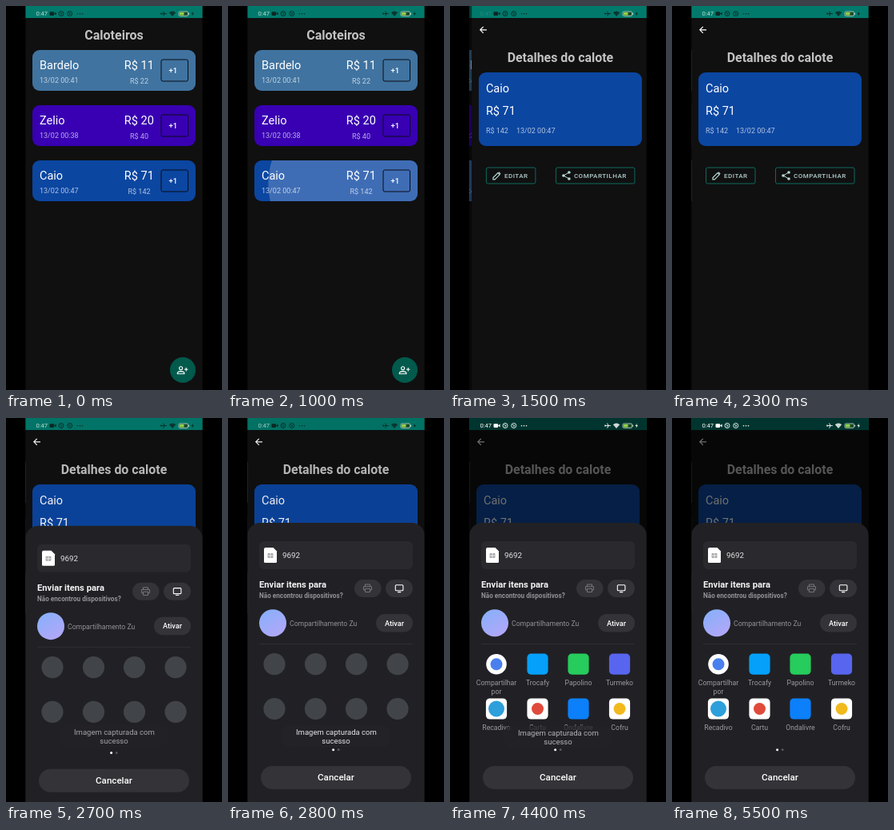
Animation, 270 px wide and 480 px high, one loop 6 s. Source, as an HTML page:

```html
<!DOCTYPE html>
<html lang="pt-BR">
<head>
<meta charset="utf-8">
<title>Caloteiros</title>
<style>
html, body { margin: 0; width: 100%; height: 100%; overflow: hidden; background: #000; }
svg { display: block; width: 100%; height: 100%; }
text { font-family: Roboto, "Noto Sans", sans-serif; white-space: pre; }
</style>
</head>
<body>
<svg id="stage" viewBox="0 0 270 480"></svg>
<script>
const LOOP = 6000, STEP = 100;
const $ = id => document.getElementById(id);
const set = (id, attrs) => {
  for (const k in attrs) $(id).setAttribute(k, attrs[k]);
};
const clamp = v => Math.max(0, Math.min(1, v));
const ramp = (t, a, b) => clamp((t - a) / (b - a));
const easeOut = v => 1 - (1 - v) ** 3;

// Markup helpers
const text = (x, y, s, size, fill = '#fff', extra = '') =>
  `<text x="${x}" y="${y}" font-size="${size}" fill="${fill}" ${extra}>${s}</text>`;
const mid = (x, y, s, size, fill, weight = 400) =>
  text(x, y, s, size, fill, `text-anchor="middle" font-weight="${weight}"`);
const rect = (x, y, w, h, r, fill, extra = '') =>
  `<rect x="${x}" y="${y}" width="${w}" height="${h}" rx="${r}" fill="${fill}" ${extra}/>`;
const dot = (x, y, r, fill, extra = '') =>
  `<circle cx="${x}" cy="${y}" r="${r}" fill="${fill}" ${extra}/>`;
const line = (d, color, w = 1, extra = '') =>
  `<path d="${d}" fill="none" stroke="${color}" stroke-width="${w}" ${extra}/>`;
const group = (id, body, extra = '') => `<g id="${id}" ${extra}>${body}</g>`;

// A 1080 x 2340 phone screen fitted to the stage height
const LEFT = 24.25, WIDTH = 221.5;
const full = (h, fill, extra) => rect(LEFT, 0, WIDTH, h, 0, fill, extra);

const BG = '#101011', TEAL = '#017a6c', SOFT = 'rgba(255,255,255,.68)', HEAD = '#c2c2c2';
const PILL = '#333338', MUTED = '#929296', LABEL = '#9b9b9f';

const card = (y, color, name, date, price, total, over = '') =>
  rect(33, y, 204, 51, 9, color) + over +
  text(42, y + 24, name, 14.5) +
  text(42, y + 40.5, date, 9, SOFT) +
  mid(166.3, y + 24, price, 14.5, '#fff') +
  mid(166.5, y + 42.3, total, 9, SOFT) +
  rect(194, y + 12, 33.5, 27, 2, 'none', 'stroke="#0a0c14"') +
  text(203.5, y + 28.5, '+1', 9.5, '#fff', 'font-weight="500"');

const list =
  full(480, BG) +
  mid(135, 41.5, 'Caloteiros', 16, HEAD, 700) +
  card(55, '#4073a0', 'Bardelo', '13/02 00:41', 'R$ 11', 'R$ 22') +
  card(124, '#3800b2', 'Zelio', '13/02 00:38', 'R$ 20', 'R$ 40') +
  card(193, '#0b46a1', 'Caio', '13/02 00:47', 'R$ 71', 'R$ 142',
    '<circle id="ripple" fill="#fff" clip-path="url(#cardClip)"/>') +
  dot(221, 455, 16, '#015a4c') +
  dot(218.6, 452.7, 2, 'none', 'stroke="#fff" stroke-width="1.1"') +
  line('M214.3 459.7V458.6Q214.8 456.7 218.6 456.6Q222.4 456.7 222.9 458.6V459.7Z', '#fff', 1.1) +
  line('M223 454.3H227.4M225.2 452.1V456.5', '#fff', 1.1);

const outlined = (x, w, label) =>
  rect(x + .5, 202, w, 20, 2, 'none', 'stroke="#0c6a5d"') +
  text(x + 23, 215, label, 8, '#b4cdc8', 'font-weight="500" letter-spacing=".5"');

const detail =
  full(480, BG) + full(15, TEAL) +
  line('M43 29.8H35M38.8 25.8L34.8 29.8L38.8 33.8', '#fff', 1.2) +
  mid(135, 69.7, 'Detalhes do calote', 15.9, HEAD, 700) +
  rect(33, 83, 204, 92, 9, '#0b46a1') +
  text(42, 108, 'Caio', 14.5) +
  text(42, 136.2, 'R$ 71', 14.5) +
  text(42, 159, 'R$ 142', 9, SOFT) +
  text(80, 159, '13/02 00:47', 9, SOFT) +
  outlined(42, 61.5, 'EDITAR') +
  line('M51 216.8V214.6L57 208.6L59.2 210.8L53.2 216.8ZM58 207.6L60.2 209.8', '#b4d8d1', 1.2) +
  outlined(129, 98.5, 'COMPARTILHAR') +
  line('M146 208L139 212L146 216', '#b4d8d1') +
  [[146, 208], [139, 212], [146, 216]].map(([x, y]) => dot(x, y, 1.8, '#b4d8d1')).join('');

// Share targets: label, tile colour, plain mark on the tile
const COLS = [58, 109.5, 160.5, 212], ROWS = [307.7, 363.5];
const APPS = [
  ['Compartilhar', '#fff', '#4a80ee'], ['Trocafy', '#05a0fa'], ['Papolino', '#26cc5c'], ['Turmeko', '#5865ee'],
  ['Recadivo', '#fff', '#2d9fdb'], ['Cartu', '#fff', '#e04a3b'], ['Ondalivre', '#0c80fa'], ['Cofru', '#fff', '#f2b91d']
];
const slot = i => [COLS[i % 4], ROWS[i >> 2]];
const holders = APPS.map((_, i) => dot(...slot(i), 13.6, '#414448')).join('');
const apps = APPS.map(([label, tile, mark], i) => {
  const [x, y] = slot(i);
  return (i ? rect(x - 13.1, y - 13.1, 26.2, 26.2, 5, tile) : dot(x, y, 12.8, tile)) +
    (mark ? dot(x, y, i === 4 ? 10 : 7.5, mark) : '') +
    mid(x, y + 26.4, label, 8.7, LABEL);
}).join('') + mid(58, 344.6, 'por', 8.7, LABEL);

const sheet =
  rect(LEFT, 131, WIDTH, 380, 16, '#212125') +
  rect(39, 154, 192, 35, 6, '#2a2a2e') +
  '<path d="M47 162H56.5L61 166.5V179.5Q61 181 59.5 181H46.5Q45 181 45 179.5V164Q45 162 47 162Z" fill="#fff"/>' +
  rect(49.5, 169, 7, 6, 1, '#a9a9ad') +
  line('M53 169V175M49.5 172H56.5', '#fff', .7) +
  text(68, 175.3, '9692', 9.8, '#e4e4e6') +
  text(39, 211.7, 'Enviar itens para', 11.2, '#f4f4f5', 'font-weight="700"') +
  text(39, 225, 'Não encontrou dispositivos?', 8.2, MUTED, 'font-weight="600"') +
  rect(158, 202, 33.5, 22, 11, PILL) +
  line('M171.5 210.5V208H177.5V210.5M171.3 215H169.5V210.7H179.5V215H177.7M171.5 213.4H177.5V217.6H171.5Z', '#7d7d82', .9) +
  rect(197, 202, 34, 22, 11, PILL) +
  rect(209.3, 208.8, 9.6, 7, 1, 'none', 'stroke="#fff" stroke-width="1.1"') +
  line('M212 217.6H216.2', '#fff', 1.1) +
  dot(56, 256.3, 17, 'url(#glow)') +
  text(77, 259.7, 'Compartilhamento Zu', 8.7, MUTED) +
  rect(185, 245, 46, 22.5, 11.2, PILL) +
  mid(208, 259.6, 'Ativar', 9.2, '#fff', 500) +
  line('M39 282.5H231', '#323236', .8) +
  group('holders', holders) + group('apps', apps) +
  dot(131.6, 414.7, 1.5, '#fff') + dot(138.2, 414.7, 1.4, '#59595e') +
  rect(41, 435, 188, 29, 14.5, PILL) +
  mid(135, 453.3, 'Cancelar', 11.6, '#fff', 500);

const toast =
  rect(66, 384.5, 137, 28, 12, '#232327') +
  mid(135.4, 396.5, 'Imagem capturada com', 9.5, '#e6e6e8') +
  mid(135, 407.8, 'sucesso', 9.5, '#e6e6e8');

const ring = x => dot(x, 9.5, 3, 'none', 'stroke="currentColor" stroke-width=".9"') +
  line(`M${x - 1.4} 8.5L${x + 1.2} 9.5L${x - .6} 11`, 'currentColor', .9);
const notices =
  rect(54.5, 7.3, 5.6, 4.6, .8, 'currentColor') +
  '<path d="M60 9.5L62.6 7.5V11.6Z" fill="currentColor"/>' +
  ring(69) + ring(79.7) +
  [89.5, 92.5, 95.5].map(x => dot(x, 9.8, .8, 'currentColor')).join('');
const signals =
  line('M193.4 9.6H200.8M196.6 6.6L198 9.6L196.6 12.6M194 8.4V10.8', 'currentColor', .9) +
  '<path d="M203.8 8.2Q208 4.8 212.2 8.2L208 13Z" fill="currentColor" fill-opacity=".8"/>' +
  '<path d="M234 6.8L231.5 10H233.1L232.4 12.6L235 9.2H233.3Z" fill="currentColor"/>';
const battery =
  rect(216, 7, 11.5, 5.4, 1.4, '#1c4a2e', 'stroke="#c9dcc9" stroke-width=".8"') +
  rect(217, 8, 5.5, 3.4, .6, '#8fd14a') +
  line('M228.7 8.6V10.8', '#c9dcc9', .9);

$('stage').innerHTML =
  `<defs>
    <clipPath id="screen"><rect x="${LEFT}" width="${WIDTH}" height="480"/></clipPath>
    <clipPath id="cardClip"><rect x="33" y="193" width="204" height="51" rx="9"/></clipPath>
    <linearGradient id="glow" x2=".6" y2="1">
      <stop stop-color="#84b0fb"/><stop offset="1" stop-color="#b0a8f8"/>
    </linearGradient>
  </defs>` +
  rect(0, 0, 270, 480, 0, '#000') +
  group('app',
    group('list', list) +
    full(15, TEAL) +
    full(480, '#000', 'id="shade"') +
    group('detail', detail) +
    full(480, '#000', 'id="dim"') +
    group('clock', text(37.5, 12.4, '0:47', 7.6, 'currentColor')) +
    group('notices', notices) + group('signals', signals) + battery +
    group('sheet', sheet) + group('toast', toast),
    'clip-path="url(#screen)"');

const mix = (a, b, k) => `rgb(${a.map((v, i) => Math.round(v + (b[i] - v) * k))})`;
const WHITE = [255, 255, 255], DARK = [12, 40, 36], PALE = [190, 218, 213];

function draw(t) {
  // Touch ripple on the third card
  const grow = ramp(t, 500, 1100);
  set('ripple', { cx: 145, cy: 222, r: 20 + 85 * Math.sin(grow * Math.PI / 2) ** 2 * .5 + 42 * grow,
    opacity: .21 * ramp(t, 500, 700) });

  // Detail page pushed in from the right
  const left = t > 1018 ? Math.exp(-9 * (t - 1018) / 1000) : 1;
  const moving = t < 1700;
  set('list', { transform: `translate(${-55.5 * (1 - left)})` });
  set('shade', { opacity: .51 * (1 - left) });
  set('detail', { transform: `translate(${moving ? WIDTH * left : 0})` });

  // Share sheet, dimmed page, loaded targets
  const up = easeOut(ramp(t, 2350, 2800));
  set('sheet', { transform: `translate(0 ${350 * (1 - up)})` });
  set('dim', { opacity: .07 * ramp(t, 2400, 2800) + .49 * ramp(t, 2900, 3300) });
  const loaded = ramp(t, 2900, 3200);
  set('holders', { opacity: 1 - loaded });
  set('apps', { opacity: loaded });

  const settled = ramp(t, 2800, 3300);
  set('toast', { opacity: ramp(t, 2500, 2800) * (1 - ramp(t, 4300, 4700)),
    transform: `translate(0 ${settled - 1})` });

  // Status icons turn white over the dimmed bar
  const lit = ramp(t, 3300, 3600);
  set('clock', { color: mix(PALE, WHITE, lit),
    opacity: 1 - (moving ? .85 * (1 - left) : 0) - .82 * ramp(t, 2700, 3300) + .82 * lit });
  set('notices', { color: mix(DARK, WHITE, ramp(t, 2900, 3300)) });
  set('signals', { color: mix(DARK, WHITE, lit) });
}

const start = performance.now();
function tick() {
  const t = (performance.now() - start) % LOOP;
  draw(Math.floor(t / STEP) * STEP);
  requestAnimationFrame(tick);
}
tick();
</script>
</body>
</html>
```
